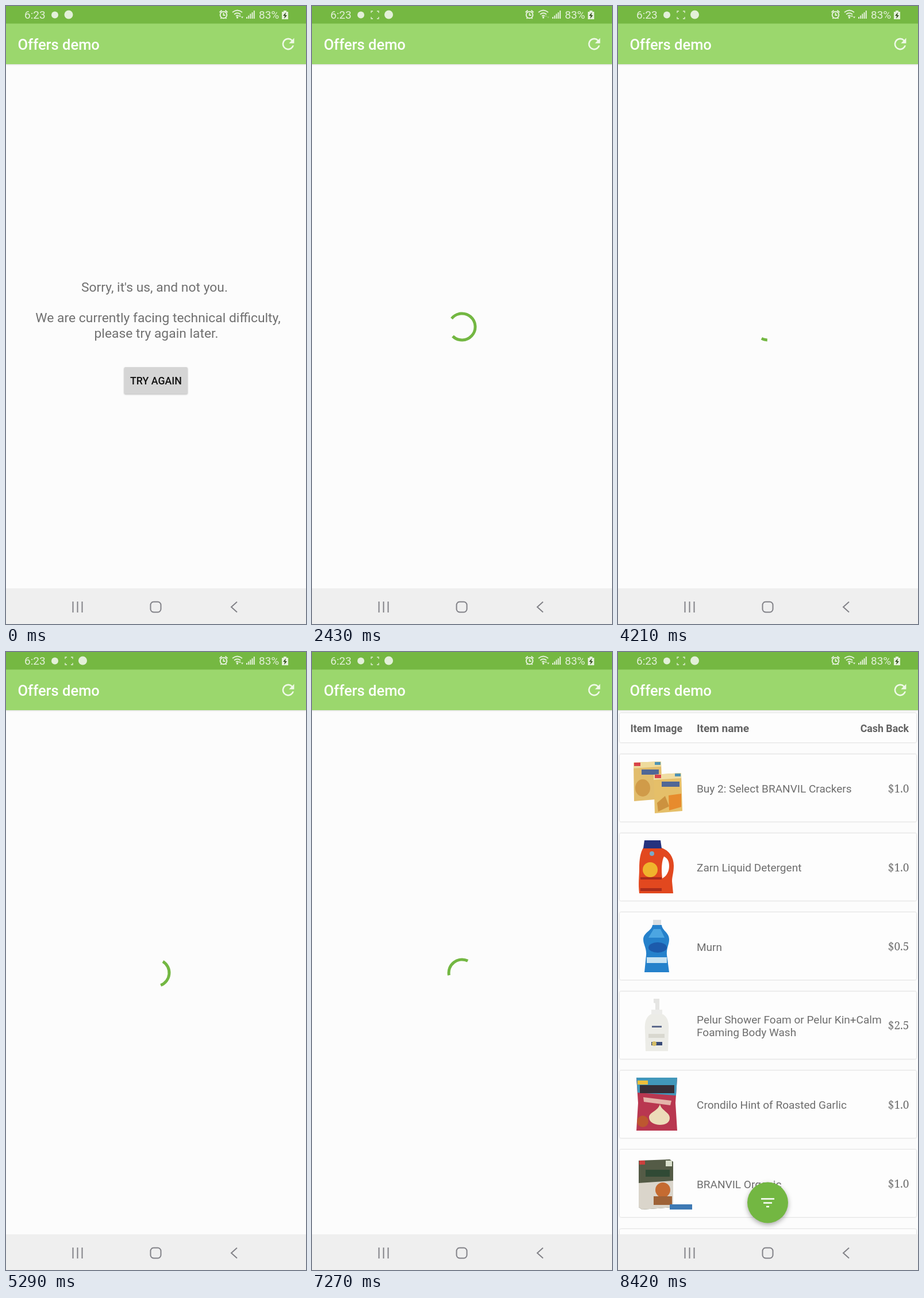
These frames come from a looping animation (522x1073 px, 8.46 s). An HTML page:

```html
<!DOCTYPE html>
<html lang="en">
<head>
<meta charset="utf-8">
<title>Offers demo</title>
<style>
  html, body { margin: 0; width: 100%; height: 100%; overflow: hidden; background: #fcfcfc }
  svg { display: block; width: 522px; height: 1073px; font-family: Roboto, sans-serif }
  .card { fill: #fdfdfd; filter: drop-shadow(0 .8px .8px #0004) }
  .row { font-size: 19.05px; fill: #6e6e6e }
  .head { font-weight: 700; fill: #626262 }
  .price { font: 19.05px "Noto Serif", serif; fill: #6e6e6e; text-anchor: end }
  .msg { font-size: 22.86px; fill: #707070; text-anchor: middle }
</style>
</head>
<body>
<svg viewBox="0 0 522 1073">
  <rect width="522" height="1073" fill="#fcfcfc"/>

  <g id="error">
    <g class="msg">
      <text x="258.5" y="496">Sorry, it's us, and not you.</text>
      <text x="264.5" y="549">We are currently facing technical difficulty,</text>
      <text x="261.5" y="576">please try again later.</text>
    </g>
    <rect x="205.500" y="627" width="110.500" height="46.500" rx="2.500" fill="#d5d5d5" style="filter:drop-shadow(0 1px 1.2px #0004)"/>
    <text x="261" y="657" font-size="17.8" font-weight="500" fill="#111" text-anchor="middle">TRY AGAIN</text>
  </g>

  <path id="spinner" fill="none" stroke="#73b742" stroke-width="5"/>

  <g id="list">
    <g id="rows"></g>
    <g id="images">
      <!-- cracker boxes -->
      <g>
        <path d="M27 192l48-2 2 65-49 4z" fill="#e2bd6c"/>
        <path d="M27 192l48-2v9l-48 3z" fill="#eedb9c"/>
        <path d="M28 192h11v6h-11z" fill="#d8434a"/><path d="M64 191h10v5h-10z" fill="#4e93b4"/>
        <path d="M41 204h30v9H41z" fill="#506796"/>
        <ellipse cx="43" cy="236" rx="13" ry="15" fill="#d09b49"/>
        <path d="M62 213l48-3 2 66-48 4z" fill="#e5bf69"/>
        <path d="M62 213l48-3v9l-48 3z" fill="#f0dda3"/>
        <path d="M64 213h11v6H64z" fill="#d8434a"/><path d="M99 211h10v5H99z" fill="#4e93b4"/>
        <path d="M76 225h31v9H76z" fill="#506796"/>
        <path d="M88 249l22-3v23l-21 6z" fill="#e78b2d"/>
        <path d="M68 262l14-12 7 18-19 9z" fill="#cc923f"/>
      </g>
      <!-- detergent jug -->
      <g>
        <path fill="#e2481f" fill-rule="evenodd" d="M44 340h32c13 5 21 16 21 31 0 12-3 19-3 27l2 21H37c-2-18 0-29 0-43 0-16 2-28 7-36zM80 355c-4 8-5 22-3 38 7-3 12-12 12-21s-3-14-9-17z"/>
        <path d="M46 327h28l2 14H44z" fill="#25327e"/>
        <circle cx="59" cy="350" r="4" fill="#79aaca"/>
        <circle cx="56" cy="378" r="13" fill="#f0b42c"/>
        <path d="M39 391h37v4H39zM39 410h37v5H39z" fill="#a92c1c"/>
      </g>
      <!-- dish soap -->
      <g>
        <path d="M61 465h14v10H61z" fill="#dcdfe2"/>
        <path d="M60 474h16c1 10 13 13 13 25 0 9-5 15-4 27l4 30H46l3-30c1-12-5-18-5-27 0-12 15-15 16-25z" fill="#2581cb"/>
        <path d="M62 481h12l7 15H53z" fill="#4ca6e2"/>
        <ellipse cx="69" cy="513" rx="16" ry="9" fill="#1c5bac"/>
        <path d="M50 530h35v10H50z" fill="#c7e2f2"/>
      </g>
      <!-- foam pump -->
      <g>
        <path d="M62 602h10v19h-3v8h-4v-19l-3-1z" fill="#e5e5e3"/>
        <path d="M58 621h19v9H58z" fill="#ececea"/>
        <path d="M57 629h21c9 5 11 15 10 29l-1 35H48l-1-35c-1-14 1-24 10-29z" fill="#ecece7"/>
        <path d="M59 649h17v3H59z" fill="#5d6a8c"/>
        <path d="M53 663h28v7H53z" fill="#d9d8d0"/>
        <path d="M58 677h19v6H58z" fill="#394b78"/>
        <circle cx="63" cy="680" r="4" fill="#d4bd68"/>
      </g>
      <!-- chip bag -->
      <g>
        <path d="M32 739h71l-3 44 3 48H32l3-48z" fill="#b93750"/>
        <path d="M32 739h71l-2 31-67-5z" fill="#4197ba"/>
        <path d="M38 752h60v14H38z" fill="#352e37"/>
        <path d="M34 744h18v7H34z" fill="#edbf3b"/>
        <path d="M44 773l49 6-2 8-46-6z" fill="#e4b3a9"/>
        <path d="M73 785c2 11 17 14 17 24 0 8-7 12-17 12s-19-5-19-13c0-9 16-11 19-23z" fill="#ecdcb9"/>
        <circle cx="43" cy="815" r="10" fill="#bd5730"/>
      </g>
      <!-- organic box -->
      <g>
        <path d="M36 883l54-2 6 4v79l-54 4-6-4z" fill="#545b46"/>
        <path d="M36 922l60-4v46l-54 4-6-4z" fill="#dad5cb"/>
        <path d="M37 883h10v7H37z" fill="#ca3f3d"/><path d="M83 883h11v10H83z" fill="#d9dfcc"/>
        <path d="M48 899h42v12H48z" fill="#304a35"/>
        <circle cx="78" cy="934" r="13" fill="#c56b31"/>
        <path d="M62 945h32v15H62z" fill="#9e6237"/>
        <rect x="90" y="959" width="39" height="9" fill="#3d79b4"/>
      </g>
    </g>
    <circle cx="260.500" cy="956" r="35.500" fill="#73b742" style="filter:drop-shadow(0 3px 4px #0005)"/>
    <path d="M249 949.500h23M253 956.500h15M258 963h5" stroke="#fff" stroke-width="2.500"/>
  </g>

  <rect y="30" width="522" height="71" fill="#9bd76d" style="filter:drop-shadow(0 1px 1.2px #0002)"/>
  <rect width="522" height="30.500" fill="#75b842"/>
  <text x="20.5" y="76" font-size="25.5" font-weight="500" fill="#fff">Offers demo</text>
  <path transform="translate(475.4 50.4) scale(1.3)" fill="#eff9e7" d="M17.65 6.35A7.95 7.95 0 0 0 12 4a8 8 0 1 0 7.73 10h-2.08A6 6 0 1 1 12 6c1.66 0 3.14.69 4.22 1.78L13 11h7V4z"/>

  <g fill="#e3f0d9" font-size="19">
    <text x="32" y="22.3">6:23</text>
    <text x="440" y="22.3">83%</text>
    <circle cx="85" cy="15.5" r="6"/>
    <circle id="badge" cy="15" r="7.5"/>
    <path id="frame" d="M103 12V9h3M113 9h3v3M116 19v3h-3M106 22h-3v-3" fill="none" stroke="#e3f0d9" stroke-width="1.3"/>
    <g fill="none" stroke="#e3f0d9" stroke-width="2">
      <circle cx="378.5" cy="15.5" r="5.8"/>
      <path d="M378.500 12v4h3M371.500 11l4-3.500M385.500 11l-4-3.500M373.500 22l1.500-2M383.500 22l-1.500-2"/>
      <path d="M394 11q8.500-7 17 0M397 14.500q5.500-4.500 11 0M400 17.500q2.500-2 5 0" stroke-width="1.7"/>
    </g>
    <circle cx="402.500" cy="20" r="1.700"/>
    <path id="arrows" d="M405 18.500l2-3 2 3zM409 18.500l2 3 2-3z"/>
    <path d="M418 19h2v3h-2zM421.200 16.500h2V22h-2zM424.400 13.500h2V22h-2zM427.600 11h2v11h-2zM430.800 8h2v14h-2z"/>
    <path d="M483 8h5v2h3v13H480V10h3z"/>
    <path d="M487 11l-5 6h3l-1 5 5-6h-3z" fill="#34501f"/>
  </g>

  <rect y="1011" width="522" height="62" fill="#efefef"/>
  <g fill="none" stroke="#818187" stroke-width="2">
    <path d="M116.500 1034v19M124.500 1034v19M132.500 1034v19M402 1034.500l-10 9 10 9"/>
    <rect x="251.500" y="1034.500" width="18" height="18" rx="5.500"/>
  </g>
</svg>
<script>
const LOOP = 8460, SPIN_AT = 1600, LIST_AT = 7530, IMAGES_AT = 7560, FADE = 200;
const el = id => document.getElementById(id);
const show = (id, on) => el(id).style.display = on ? '' : 'none';
const clamp = x => Math.min(1, Math.max(0, x));

const offers = [
  ['$1.0', 'Buy 2: Select BRANVIL Crackers'],
  ['$1.0', 'Zarn Liquid Detergent'],
  ['$0.5', 'Murn'],
  ['$2.5', 'Pelur Shower Foam or Pelur Kin+Calm', 'Foaming Body Wash'],
  ['$1.0', 'Crondilo Hint of Roasted Garlic'],
  ['$1.0', 'BRANVIL Organic']
];
const card = (y, h) => `<rect class="card" x="3" y="${y}" width="516" height="${h}" rx="2"/>`;
const text = (cls, x, y, s, more = '') => `<text class="${cls}" x="${x}" y="${y}" ${more}>${s}</text>`;
const small = 'style="font-size:17.8px"';

el('rows').innerHTML = card(106, 51)
  + text('row head', 21.5, 139, 'Item Image', small)
  + text('row head', 137, 139.3, 'Item name')
  + text('row head', 506, 139, 'Cash Back', small + ' text-anchor="end"')
  + offers.map(([price, ...lines], i) => {
    const y = 177.5 + 137.3 * i, base = y + 66.5 - 11.2 * (lines.length - 1);
    return card(y, 117) + text('price', 506.5, y + 66, price)
      + lines.map((s, k) => text('row', 137, base + 22.3 * k, s)).join('');
  }).join('') + card(1002, 117);

// Cubic easing through two control points from (x0, 0) to (x1, 1), solved by bisection.
function ease(x, x0, c0, c1, x1) {
  if (x <= x0) return 0;
  if (x >= x1) return 1;
  let lo = 0, hi = 1, s;
  for (let i = 0; i < 20; i++) {
    s = (lo + hi) / 2;
    const r = 1 - s;
    if (x0 * r ** 3 + 3 * c0 * r * r * s + 3 * c1 * r * s * s + x1 * s ** 3 < x) lo = s;
    else hi = s;
  }
  return s * s * (3 - 2 * s);
}

// time, sweep cycles, overall turn in degrees
const pace = [
  [SPIN_AT, 0.1, -353], [2430, 1.42, 38], [4210, 4.07, 902.6],
  [5290, 5.687, 1408.7], [7270, 8.688, 2265.5], [LIST_AT, 9.08, 2378]
];

function arc(t) {
  const i = pace.findIndex(p => t < p[0]);
  const a = pace[i - 1], b = pace[i], f = (t - a[0]) / (b[0] - a[0]);
  const cycle = a[1] + (b[1] - a[1]) * f, turn = a[2] + (b[2] - a[2]) * f;
  const n = Math.floor(cycle), u = cycle - n;
  const from = 270 * ease(u, 0.5, 0.7, 0.6, 1);
  const to = 10 + 270 * ease(u, 0, 0.2, 0.1, 0.5);
  const point = deg => {
    const r = (deg + turn + 270 * n) * Math.PI / 180;
    return `${261 + 23 * Math.sin(r)} ${557 - 23 * Math.cos(r)}`;
  };
  return `M${point(from)}A23 23 0 ${to - from > 180 ? 1 : 0} 1 ${point(to)}`;
}

function draw(t) {
  const spinning = t >= SPIN_AT && t < LIST_AT;
  show('error', t < SPIN_AT);
  show('spinner', spinning);
  show('list', t >= LIST_AT);
  el('images').style.opacity = clamp((t - IMAGES_AT) / FADE);
  if (spinning) el('spinner').setAttribute('d', arc(t));

  const slide = 1 - (1 - clamp((t - 30) / 390)) ** 3;
  el('badge').setAttribute('cx', 109 + 24.5 * slide);
  el('frame').style.opacity = slide;
  el('arrows').style.opacity = t >= 1040 && t < 3700 ? 0.35 : 1;
}

const begin = performance.now();
function tick() {
  draw((performance.now() - begin) % LOOP);
  requestAnimationFrame(tick);
}
tick();
</script>
</body>
</html>
```
